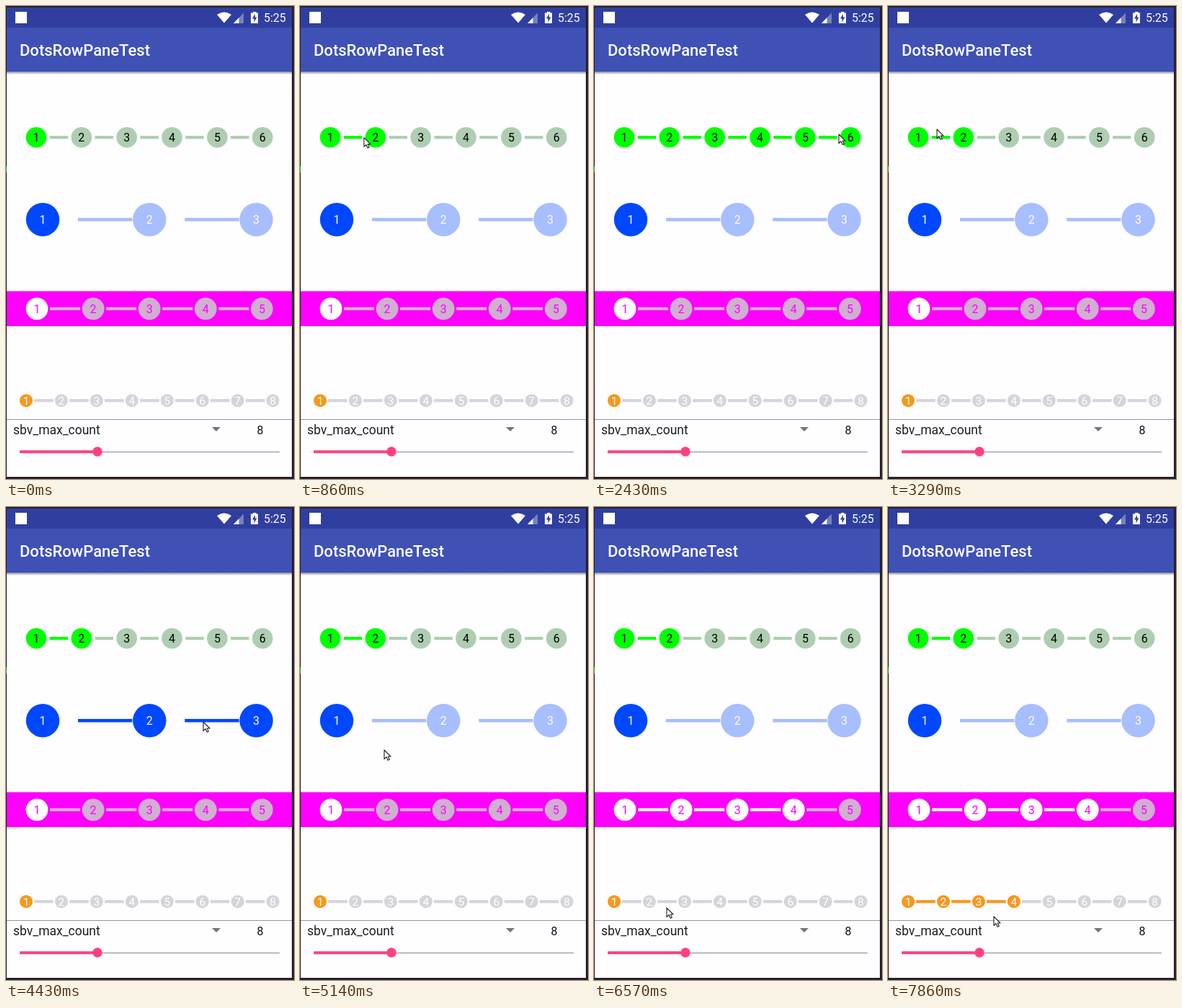
Recreate the animation shown at these times as an HTML page. Size 400 by 656 pixels, loop 8 s.

```html
<!DOCTYPE html>
<html lang="en">
<head>
<meta charset="utf-8">
<title>Step bars</title>
<style>
  html, body { margin: 0; width: 100%; height: 100%; overflow: hidden; background: #25222c; }
  svg { display: block; width: 100%; height: 100%; }
  text { font-family: Roboto, sans-serif; }
</style>
</head>
<body>
<svg id="stage" viewBox="0 0 400 656">
  <defs>
    <linearGradient id="shade" x2="0" y2="1">
      <stop offset="0" stop-color="#8d8d95"/>
      <stop offset="1" stop-color="#fefdff"/>
    </linearGradient>
  </defs>
  <rect width="400" height="656" fill="#25222c"/>
  <rect y="222" width="1.5" height="9" fill="#19b52a"/>
  <rect x="1" y="2" width="396" height="651" fill="#fefdff"/>
  <rect x="1" y="2" width="396" height="28" fill="#303f9f"/>
  <rect x="1" y="30" width="396" height="61" fill="#3f51b5"/>
  <rect x="1" y="91" width="396" height="4" fill="url(#shade)"/>

  <g fill="#fff">
    <rect x="13" y="8" width="16" height="16"/>
    <path d="M303 23.5 L293 12 Q303 5 313 12 Z"/>
    <path d="M316 24 L330 9.500 V24 Z" opacity=".35"/>
    <path d="M316 24 L323.500 16.200 V24 Z"/>
    <path d="M343 9.500 V8 H347.500 V9.500 H350 V24 H340 V9.500 Z"/>
    <text x="358" y="22" font-size="16">5:25</text>
    <text x="19" y="69" font-size="22" font-weight="500">DotsRowPaneTest</text>
  </g>
  <path d="M346 11 L342 17.500 H344.500 V22.500 L348.500 15.500 H346 Z" fill="#303f9f"/>

  <rect x="1" y="395.500" width="396" height="48.500" fill="#f0f"/>
  <g id="bars"></g>

  <path d="M1 573.500 H397" stroke="#98969b"/>
  <text x="10" y="594" font-size="17.500" fill="#1f1f1f">sbv_max_count</text>
  <path d="M286 584 H298 L292 590 Z" fill="#757575"/>
  <text x="353" y="594" font-size="16" text-anchor="middle" fill="#111">8</text>
  <path d="M127 618.500 H380" stroke="#a5a3a8" stroke-width="1.300"/>
  <path d="M19 618.200 H127" stroke="#ff4081" stroke-width="4"/>
  <circle cx="127" cy="618" r="6.700" fill="#ff4081"/>

  <path id="cursor" d="M0 0 V12.500 L3 9.700 L5.200 14.300 L7.300 13.300 L5.200 9 H9 Z"
        fill="#fff" stroke="#222" stroke-width="1.100" stroke-linejoin="round"/>
</svg>
<script>
const NS = 'http://www.w3.org/2000/svg';
const LOOP = 8000, RATE = 7;
const holder = document.getElementById('bars');
const cursor = document.getElementById('cursor');

// from/to: line insets from the circle centres; drag: press and release times
const bars = [
  { n: 6, x: 42, y: 182.2, gap: 62.85, r: 14.3, from: 18.7, to: 18.7, w: 4.2, size: 16,
    on: '#00ff00', off: '#aecdb1', ink: '#000', drag: [550, 3290] },
  { n: 3, x: 51, y: 296.2, gap: 148.3, r: 23.2, from: 49, to: 24, w: 4.6, size: 16,
    on: '#0048ff', off: '#a7beff', ink: '#fff', drag: [3830, 5000] },
  { n: 5, x: 43, y: 419.8, gap: 78.1, r: 15.4, from: 18, to: 18, w: 4.2, size: 16,
    on: '#ffffff', off: '#d0afd0', ink: '#f0f', drag: [5430, 6290] },
  { n: 8, x: 28, y: 547.2, gap: 48.95, r: 9, from: 11.2, to: 11.2, w: 4.2, size: 15.5,
    on: '#f7981d', off: '#d6d4d8', ink: '#fff', drag: [6850, 7860] }
];

// pointer route: time, x, y
const route = [
  [140, 14, 262], [550, 42, 184], [1000, 110, 182], [1570, 228, 180],
  [2140, 350, 180], [2430, 340, 178], [3290, 68, 171], [3430, 68, 171],
  [3830, 56, 294], [4430, 274, 298], [4570, 262, 300], [5000, 50, 305],
  [5140, 117, 337], [5430, 44, 419], [6000, 250, 424], [6290, 268, 428],
  [6570, 101, 556], [6850, 28, 548], [7720, 143, 566], [7860, 147, 568]
];

function add(name, attrs, text) {
  const el = document.createElementNS(NS, name);
  for (const key in attrs) el.setAttribute(key, attrs[key]);
  if (text) el.textContent = text;
  holder.append(el);
  return el;
}

for (const b of bars) {
  b.steps = [];
  for (let i = 0; i < b.n; i++) {
    const cx = b.x + i * b.gap, parts = [];
    if (i) {
      parts.push(add('rect', {
        x: cx - b.gap + b.from, y: b.y - b.w / 2, width: b.gap - b.from - b.to, height: b.w
      }));
    }
    parts.push(add('circle', { cx, cy: b.y, r: b.r }));
    add('text', {
      x: cx, y: b.y + b.size * 0.36, 'font-size': b.size, 'text-anchor': 'middle', fill: b.ink
    }, String(i + 1));
    b.steps.push(parts);
  }
}

function pointer(t) {
  let i = 1;
  while (i < route.length - 1 && route[i][0] < t) i++;
  const [t0, x0, y0] = route[i - 1], [t1, x1, y1] = route[i];
  const k = Math.min(1, Math.max(0, (t - t0) / (t1 - t0)));
  return [x0 + (x1 - x0) * k, y0 + (y1 - y0) * k];
}

// a step lights up once the pointer passes the circle before it
function level(b, t) {
  if (t < b.drag[0]) return 1;
  const x = pointer(Math.min(t, b.drag[1]))[0];
  return Math.min(b.n, Math.max(1, 1 + Math.ceil((x - b.x - b.r * 0.6) / b.gap)));
}

function draw(time) {
  const tick = Math.floor((time % LOOP + 5) * RATE / 1000);
  const t = Math.round(tick * 100 / RATE) * 10;
  for (const b of bars) {
    const lit = level(b, t);
    b.steps.forEach((parts, i) => {
      for (const p of parts) p.setAttribute('fill', i < lit ? b.on : b.off);
    });
  }
  const [x, y] = pointer(t);
  cursor.setAttribute('transform', `translate(${x} ${y})`);
  cursor.setAttribute('visibility', tick % (LOOP * RATE / 1000) ? 'visible' : 'hidden');
}

const start = performance.now();
function frame() {
  draw(performance.now() - start);
  requestAnimationFrame(frame);
}
draw(0);
requestAnimationFrame(frame);
</script>
</body>
</html>
```
